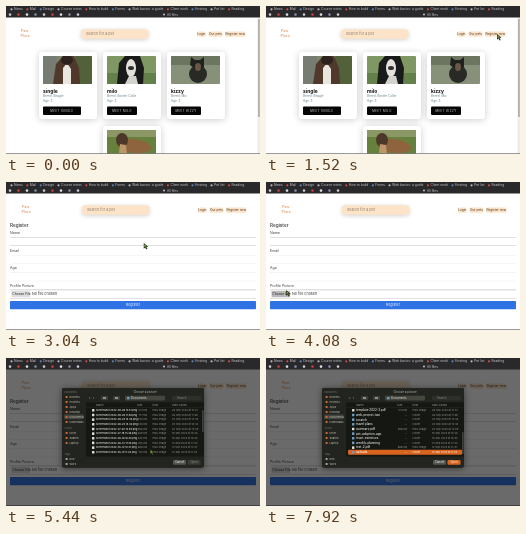
An HTML page with a canvas that plays this animation: 254x148 px, repeating every 8 s.

```html
<!DOCTYPE html>
<html lang="en">
<head>
<meta charset="utf-8">
<title>Pet adoption: register and pick a picture</title>
<style>
html, body { margin: 0; width: 100%; height: 100%; overflow: hidden; background: #fff; }
canvas { display: block; width: 254px; height: 148px; }
</style>
</head>
<body>
<canvas id="stage"></canvas>
<script>
const W = 254, H = 148, LOOP = 8000;
const canvas = document.getElementById('stage');
const scale = window.devicePixelRatio || 1;
canvas.width = W * scale;
canvas.height = H * scale;
const ctx = canvas.getContext('2d');

// Moments at which the picture switches
const HOVER = 1600, REGISTER = 1920, LEAVE = 2640, DIALOG = 4800, ACTIVE = 5040,
      SELECT = 6080, CURSOR_OFF = 7120, LAST_ROW = 7920;

// Pointer path: time, x, y
const PATH = [
  [0, 258, 140], [880, 237, 62], [1440, 231, 28], [2640, 231, 28],
  [3520, 16, 104], [3920, 20, 108], [4080, 20, 108], [4640, 144, 91],
  [5600, 144, 91], [5920, 120, 70], [8000, 120, 70]
];

function box(x, y, w, h, fill, r = 0) {
  ctx.fillStyle = fill;
  ctx.beginPath();
  ctx.roundRect(x, y, w, h, r);
  ctx.fill();
}

function dot(x, y, r, fill) {
  ellipse(x, y, r, r, fill);
}

function ellipse(x, y, rx, ry, fill, turn = 0) {
  ctx.fillStyle = fill;
  ctx.beginPath();
  ctx.ellipse(x, y, rx, ry, turn, 0, 7);
  ctx.fill();
}

function poly(fill, ...p) {
  ctx.fillStyle = fill;
  ctx.beginPath();
  for (let i = 0; i < p.length; i += 2) ctx.lineTo(p[i], p[i + 1]);
  ctx.closePath();
  ctx.fill();
}

function text(str, x, y, size, fill, { weight = 400, align = 'left', font = 'Inter', space = 0 } = {}) {
  ctx.font = `${weight} ${size}px ${font}, sans-serif`;
  ctx.letterSpacing = space + 'px';
  ctx.textAlign = align;
  ctx.textBaseline = 'middle';
  ctx.fillStyle = fill;
  ctx.fillText(str, x, y);
}

function shadowBox(x, y, w, h, fill, r, blur, alpha) {
  ctx.save();
  ctx.shadowColor = `rgba(0,0,0,${alpha})`;
  ctx.shadowBlur = blur * scale;
  ctx.shadowOffsetY = scale;
  box(x, y, w, h, fill, r);
  ctx.restore();
}

function browserBar() {
  box(0, 0, W, 11.5, '#29292c');
  const tabs = ['News', 'Mail', 'Design', 'Course notes', 'How to build', 'Forms', 'Web basics: a guide', 'Client work', 'Hosting', 'Pet list', 'Reading'];
  let x = 8;
  tabs.forEach((tab, i) => {
    dot(x - 2.5, 3.3, 1.1, ['#b9b9bd', '#cf4b46', '#5a83bd'][i % 3]);
    text(tab, x, 3.5, 3.3, '#c9c9cc');
    x += ctx.measureText(tab).width + 7;
  });
  for (let i = 0; i < 9; i++) {
    dot(4 + i * 8.5, 8.6, 1.3, ['#c8c8cc', '#be4038', '#dddddf', '#7d8ba8'][i % 4]);
  }
  dot(158, 8.6, 1, '#c8c8cc');
  text('All files', 161, 8.7, 3.2, '#c9c9cc');
}

function header(shift) {
  text('Paw', 15 + shift, 24.5, 4, '#d98a55', { font: 'Lato' });
  text('Place', 14.5 + shift, 29.7, 4, '#d98a55', { font: 'Lato' });
  shadowBox(75 + shift, 23.3, 67.5, 9.4, '#fde4c8', 3.5, 4, .18);
  text('Search for a pet', 80 + shift, 28.2, 3.7, '#8b7a69');
  [[191, 8.5, 'Login'], [202.5, 14, 'Our pets'], [219, 20.5, 'Register now']].forEach(([x, w, label]) => {
    box(x + shift, 25.4, w, 5.4, '#fde4c8', 1.5);
    text(label, x + shift + w / 2, 28.2, 3.2, '#4c3a2c', { align: 'center' });
  });
}

// Each photo is painted in a 49 x 28 box
const photos = [
  () => {
    box(0, 0, 49, 28, '#7d8767');
    box(0, 0, 14, 28, '#777c72');
    box(32, 0, 17, 28, '#526139');
    poly('#50392b', 10, 28, 13, 8, 20, 0, 31, 0, 36, 12, 37, 28);
    poly('#e9e5df', 20, 28, 20, 12, 24, 7, 28, 13, 28, 28);
    ellipse(24, 4, 6, 5, '#2b221e');
  },
  () => {
    box(0, 0, 49, 28, '#7f9863');
    box(0, 17, 49, 11, '#64814b');
    poly('#191a1a', 10, 28, 12, 7, 18, 0, 33, 0, 37, 12, 36, 28);
    ellipse(24, 12, 5, 9, '#e4e0dc');
    ellipse(24, 12, 3, 2, '#34302f');
    poly('#d4d2cc', 18, 28, 22, 20, 29, 20, 31, 28);
  },
  () => {
    box(0, 0, 49, 28, '#87917a');
    box(0, 0, 49, 9, '#6c755f');
    ellipse(27, 18, 9, 9, '#292a26');
    poly('#21221f', 19, 9, 20, 1, 24, 4, 29, 4, 33, 1, 33, 11, 27, 15);
    ellipse(27, 11, 3, 4, '#695747');
  },
  () => {
    box(0, 0, 49, 28, '#66813d');
    box(0, 0, 49, 7, '#8b9865');
    ellipse(27, 16, 17, 7, '#8d643d', .12);
    ellipse(15, 10, 6, 7, '#4c3828');
    poly('#bc9669', 13, 14, 19, 15, 20, 24, 12, 23);
  }
];

function card(x, y, photo, name, details, buttonWidth) {
  shadowBox(x, y, 58, 67, '#fff', 3, 7, .2);
  ctx.save();
  ctx.translate(x + 4, y + 4);
  ctx.beginPath();
  ctx.roundRect(0, 0, 49, 28, 1);
  ctx.clip();
  photos[photo]();
  ctx.restore();
  if (!name) return;
  text(name, x + 4, y + 39, 5, '#111', { weight: 700 });
  text(details, x + 4, y + 44.5, 3.1, '#637d8b');
  text('Age: 3', x + 4, y + 49.3, 3.1, '#637d8b');
  box(x + 4, y + 54.5, buttonWidth, 8.5, '#050505', 1);
  text('MEET ' + name.toUpperCase(), x + 4 + buttonWidth / 2, y + 58.9, 2.8, '#ddd',
    { align: 'center', space: .45 });
}

function petsPage() {
  header(0);
  card(33, 46, 0, 'single', 'Breed: Beagle', 38);
  card(97, 46, 1, 'milo', 'Breed: Border Collie', 30);
  card(161, 46, 2, 'kizzy', 'Breed: Mix', 30);
  card(97, 120, 3);
  box(251.5, 11.5, 2.5, 136.5, '#ececec');
  box(252.3, 13, 1.3, 98, '#999', .6);
}

function registerPage(t) {
  header(1);
  text('Register', 4, 43.7, 4.7, '#333', { weight: 500 });
  [['Name', 51], ['Email', 69], ['Age', 86.3], ['Profile Picture', 103.6]].forEach(([label, y], i) => {
    text(label, 4, y, 3.6, '#444');
    const line = i % 3 ? '#f0f0f0' : '#c4c4c4';
    box(4, y + 4, 246, .6, line);
    box(4, y + 12.4, 246, .6, line);
  });
  const over = t > 3680 && t < 4240;
  box(5.5, 109, 18.5, 6.2, over ? '#b8b8b8' : '#dedede', .6);
  text('Choose File', 6.3, 112.2, 3.3, '#222');
  text('No file chosen', 26, 112.2, 3.7, '#333');
  box(4, 119, 246, 8.3, '#2f72e4', .8);
  text('Register', 127, 123.3, 3.7, '#e8f0ff', { align: 'center' });
}

function sidebar(active) {
  box(56, 30, 24, 79.5, active ? '#22251f' : '#30342d', [2, 0, 0, 2]);
  const groups = [
    [34, 'Favourites', ['Recents', 'Projects', 'Apps', 'Desktop', 'Documents', 'Downloads']],
    [70, 'Cloud', ['Drive', 'Shared', 'Laptop']],
    [96, 'Tags', ['Red', 'Work']]
  ];
  box(58, 56.6, 19.5, 4.7, active ? '#42443d' : '#41453d', 1);
  groups.forEach(([y, title, items]) => {
    text(title, 58.5, y, 2.5, '#74756d');
    items.forEach((item, i) => {
      const rowY = y + 5 * (i + 1);
      const icon = title === 'Tags' ? '#a8a8a2' : active ? '#d66b36' : '#777a72';
      box(59.5, rowY - 1.1, 2.2, 2.2, icon, .8);
      text(item, 63.5, rowY, 2.7, active ? '#c4c4bd' : '#94978f');
    });
  });
}

function fileRow(i, atEnd, selected) {
  const y = 52.3 + i * 4.66;
  if (selected) box(82, y - 2.4, 114, 4.8, '#d9641f', .8);
  const tone = selected ? '#fff' : '#94958d';
  const folder = atEnd && i % 4 !== 0;
  box(86, y - 1.3, 2.4, 2.6, folder ? '#6d9cc6' : '#deded9', .4);
  const folders = ['template 2022-3.pdf', 'web-project-two', 'scratch', 'travel plans', 'summary.pdf',
    'pet-adoption-app', 'react-exercises', 'weekly-planning', 'test-2.pdf', 'uploads'];
  const name = atEnd ? folders[i]
    : `Screenshot 2022-0${9 - (i >> 1)}-${28 - i * 2} 1${i % 8}.${51 - i * 3}.png`;
  text(name, 90, y, atEnd ? 3 : 2.5, selected ? '#fff' : '#f0f0ed', { weight: 500 });
  text(folder ? '--' : 104 + i * 73 + ' KB', 141, y, 2.7, tone, { align: 'right' });
  text(folder ? 'Folder' : 'PNG image', 146.5, y, 2.6, tone);
  text(`${28 - i * 2} Sep 2022 at 1${i % 8}:${51 - i * 3}`, 166, y, 2.6, tone);
}

function fileDialog(t) {
  const active = t >= ACTIVE, chosen = t >= SELECT, atEnd = t >= LAST_ROW;
  shadowBox(56, 30, 142, 79.5, '#151712', 2, 6, .5);
  sidebar(active);
  box(80, 30, 118, 14.5, '#22241f', [0, 2, 0, 0]);
  text('Choose a picture', 139, 33.8, 2.9, '#b9b9b5', { align: 'center' });
  text('‹  ›', 83, 40, 4, '#aaa');
  [95, 107].forEach(x => {
    box(x, 37.9, 7, 4.4, '#3b3d37', 1);
    box(x + 2, 39.3, 3, 1.5, '#aaa');
  });
  box(119, 37.8, 40, 4.6, '#45473f', 1);
  box(121, 39, 2.4, 2.2, '#65a5cb', .4);
  text('Documents', 125, 40.2, 2.9, '#e0e0dc');
  box(166, 37.8, 29, 4.6, '#2d302a', 1);
  text('Search', 171, 40.2, 2.8, '#888');
  [['Name', 90], ['Size', 131], ['Kind', 146.5], ['Date Added', 166]].forEach(([label, x]) =>
    text(label, x, 47.4, 2.7, '#9b9b97'));
  box(80, 49.5, 117, .3, '#3a3c36');

  const selectedRow = atEnd ? 9 : chosen ? 4 : -1;
  for (let i = 0; i < 10; i++) fileRow(i, atEnd, i === selectedRow);
  box(196.6, atEnd ? 74 : 52, .7, 22, '#777', .3);

  box(80, 98.4, 118, 11.1, '#22241f', [0, 0, 2, 0]);
  box(167, 102, 13, 4.8, '#53554e', 1);
  text('Cancel', 173.5, 104.5, 2.8, '#eee', { align: 'center' });
  box(181.5, 102, 13, 4.8, chosen ? '#d9641f' : '#393b35', 1);
  text('Open', 188, 104.5, 2.8, chosen ? '#fff' : '#888', { align: 'center' });
}

function pointer(t) {
  const i = PATH.findIndex(([time]) => time > t);
  const [t0, x0, y0] = PATH[i - 1], [t1, x1, y1] = PATH[i];
  const u = (t - t0) / (t1 - t0), k = u * u * (3 - 2 * u);
  ctx.save();
  ctx.translate(x0 + (x1 - x0) * k, y0 + (y1 - y0) * k);
  poly('#252e1c', 0, 0, 0, 5.7, 1.4, 4.5, 2.5, 6.5, 3.7, 5.9, 2.7, 4, 4.5, 3.8);
  poly('#81a84a', .6, 1.3, .6, 4.3, 1.6, 3.6, 2.7, 5.6, 2.9, 5.4, 1.9, 3.3, 3.1, 3.3);
  ctx.restore();
}

function draw(t) {
  ctx.setTransform(scale, 0, 0, scale, 0, 0);
  box(0, 0, W, H, '#fff');
  if (t < REGISTER) petsPage();
  else registerPage(t);
  box(0, 147.3, W, .7, '#777');
  if (t >= HOVER && t < LEAVE) {
    box(0, 143.7, 93, 4.3, '#39393c', [0, 1, 0, 0]);
    text('https://pets.example.com/account/register/new-member', 2, 146, 3, '#ccc');
  }
  const fade = Math.max(0, Math.min(1, (t - DIALOG) / 140));
  box(0, 0, W, H, `rgba(8,8,8,${.6 * fade})`);
  browserBar();
  if (fade) {
    ctx.globalAlpha = fade;
    fileDialog(t);
    ctx.globalAlpha = 1;
  }
  if (t < CURSOR_OFF) pointer(t);
}

const start = performance.now();
function tick() {
  draw((performance.now() - start) % LOOP);
  requestAnimationFrame(tick);
}
tick();
</script>
</body>
</html>
```
